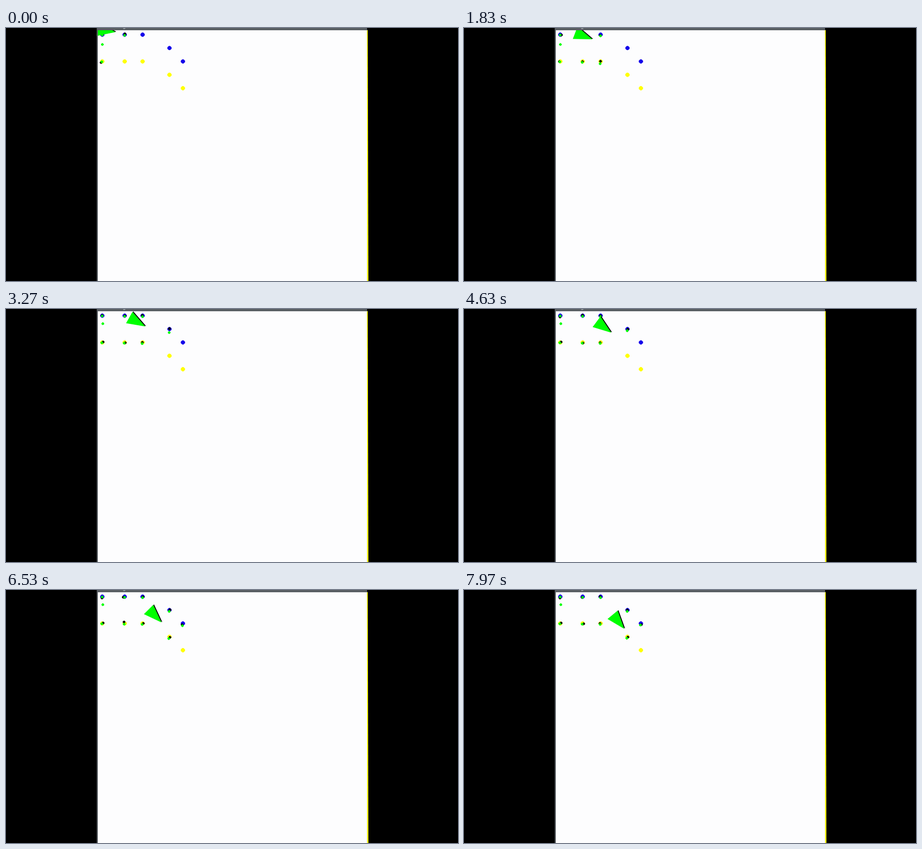
Recreate the animation shown at these times as an HTML page. Size 999 px wide and 561 px high, loop 8000 ms.

```html
<!DOCTYPE html>
<html lang="en">
<head>
<meta charset="utf-8">
<title>Landmark tracking</title>
<style>
  html, body { margin: 0; width: 100%; height: 100%; overflow: hidden; background: #000; }
  svg { display: block; width: 999px; height: 561px; }
  text { font: 12px "DejaVu Sans", sans-serif; fill: #c4ccd0; }
</style>
</head>
<body>
<svg viewBox="0 0 999 561">
  <defs>
    <path id="landmark" d="M-1.5-4.7h3l3.2 3.2v3l-3.2 3.2h-3l-3.2-3.2v-3z"/>
    <path id="mark" d="M-.8-3h1.6L3-.8V.8L.8 3H-.8L-3 .8V-.8z"/>
    <path id="triangle" d="M27 0L-13.5 14.5V-14.5z"/>
  </defs>
  <rect x="202" y="4" width="596.5" height="557" fill="#fdfdfe"/>
  <path d="M797.7 5H799.5L801 561H798.3z" fill="#ff0"/>
  <g id="landmarks"></g>
  <g id="readings"></g>
  <g id="estimates" fill="#0f0"></g>
  <g id="trueCar"><use href="#triangle"/></g>
  <g id="car" fill="#0f0"><use href="#triangle"/></g>
  <path d="M0 0H200.5V561H0z"/>
  <path d="M200.5 0H798V5H203V561H200.5z" fill="#595e63"/>
  <text x="257.5" y="-1">g</text>
</svg>
<script>
const LOOP = 8000, FPS = 30, RANGE = 80;
const ORIGIN = { x: 202.9, y: 4.8 }, CELL = 9.9;
const TILT = 0.015;      // the estimated map is turned slightly
const NOISE = 0.025;     // reading error per pixel of distance
const LAST_STEP = LOOP / 1000 * FPS - 1;

const cubic = (t, a, b, c, d) => a + t * (b + t * (c + t * d));
const carAt = t => ({
  x: cubic(t, 215.3, 26.9, -2, 0.068),
  y: cubic(t, 5.3, 4.4, 0.65, -0.032),
  angle: cubic(t, 8, 7.4, -0.26, 0)
});

function random(seed) {
  const value = Math.sin(seed * 12.9898) * 43758.5453;
  return value - Math.floor(value);
}
const spread = seed => random(seed) + random(seed + 0.3) + random(seed + 0.6) - 1.5;

const byId = id => document.getElementById(id);
function addDot(group, shape, fill) {
  const dot = document.createElementNS("http://www.w3.org/2000/svg", "use");
  dot.setAttribute("href", "#" + shape);
  if (fill) dot.setAttribute("fill", fill);
  return byId(group).appendChild(dot);
}
function place(node, x, y, angle = 0) {
  node.setAttribute("transform", `translate(${x} ${y}) rotate(${angle})`);
}
function distanceAt(step, mark) {
  const car = carAt(step / FPS);
  return Math.hypot(car.x - mark.x, car.y - mark.y);
}

function addLandmark(column, row, fill) {
  const mark = {
    x: ORIGIN.x + column * CELL, y: ORIGIN.y + row * CELL,
    seed: column * 7 + row * 3,
    reading: addDot("readings", "mark"),
    estimate: addDot("estimates", "mark")
  };
  place(addDot("landmarks", "landmark", fill), mark.x, mark.y);
  const inRange = [];
  for (let step = 0; step <= LAST_STEP; step++) {
    if (distanceAt(step, mark) < RANGE) inRange.push(step);
  }
  mark.first = inRange.length ? inRange[0] : Infinity;
  mark.last = inRange.at(-1);
  return mark;
}
const marks = [[1, 1], [6, 1], [10, 1], [16, 4], [19, 7]].flatMap(([column, row]) => [
  addLandmark(column, row, "#1400ea"),
  addLandmark(column, row + 6, "#ff0")
]);
const strayEstimate = addDot("estimates", "mark");

function drawMark(mark, step) {
  const visibility = step >= mark.first ? "visible" : "hidden";
  mark.reading.setAttribute("visibility", visibility);
  mark.estimate.setAttribute("visibility", visibility);
  if (step < mark.first) return;

  // Out of range, the last reading stays.
  const readStep = Math.min(step, mark.last);
  const error = NOISE * distanceAt(readStep, mark) * 2;
  const seed = readStep * 5 + mark.seed;
  place(mark.reading, mark.x + spread(seed) * error, mark.y + spread(seed + 2) * error);

  const settling = mark.first ? 5 * Math.exp((mark.first - step) / FPS / 0.7) : 0;
  place(mark.estimate,
    mark.x - TILT * (mark.y - ORIGIN.y),
    mark.y + TILT * (mark.x - ORIGIN.x) + 0.7 + settling);
}

function draw(time) {
  const step = Math.min(LAST_STEP, Math.floor(time / 1000 * FPS + 0.3));
  const t = step / FPS;
  const car = carAt(t);
  place(byId("car"), car.x, car.y, car.angle);
  place(byId("trueCar"), car.x + 1.8, car.y - 1, car.angle);
  const shift = Math.min(1, Math.max(0, t - 2));
  place(strayEstimate, 213 + shift, 36.5 - 4 * shift);
  marks.forEach(mark => drawMark(mark, step));
}

const start = performance.now();
function tick(now) {
  draw(Math.max(0, now - start) % LOOP);
  requestAnimationFrame(tick);
}
draw(0);
requestAnimationFrame(tick);
</script>
</body>
</html>
```
